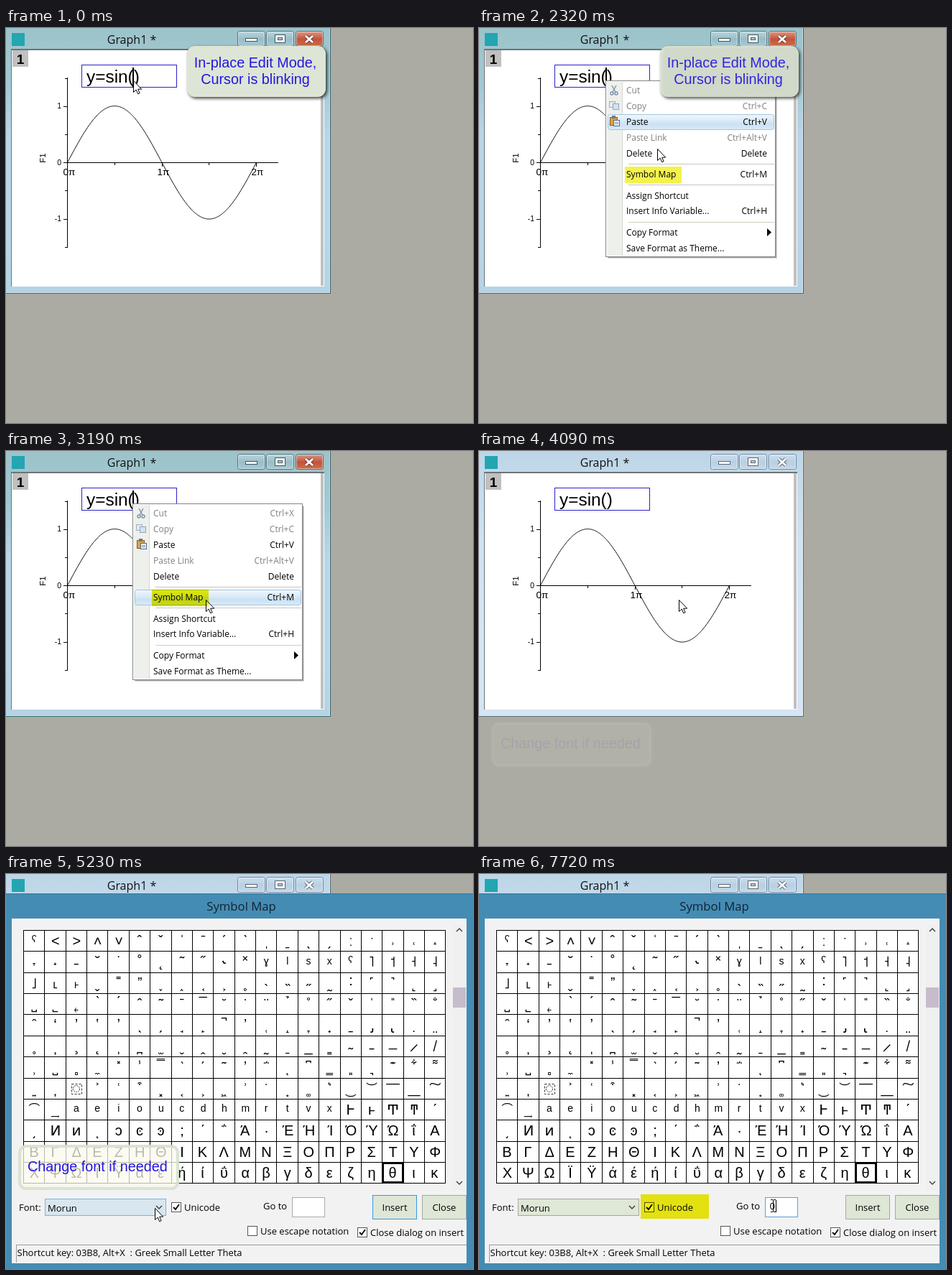
Write an HTML page with a canvas that moves like this. It is 650 px wide and 550 px high and loops after 8 s.

```html
<!DOCTYPE html>
<html lang="en">
<head>
<meta charset="utf-8">
<title>Symbol Map</title>
<style>
html, body { margin: 0; width: 100%; height: 100%; overflow: hidden; background: #acaba3; }
canvas { display: block; }
</style>
</head>
<body>
<canvas id="stage" width="650" height="550"></canvas>
<script>
const LOOP = 8000;
const W = 650, H = 550;
const PLAIN = '"Liberation Sans", "DejaVu Sans", sans-serif';
const UI = '"Open Sans", "Noto Sans", sans-serif';
const stage = document.getElementById('stage').getContext('2d');
let c = stage;

// Timing helpers
const ramp = (t, a, b) => Math.min(1, Math.max(0, (t - a) / (b - a)));
const smooth = u => u * u * (3 - 2 * u);
const mix = (a, b, u) => a + (b - a) * u;
const pulse = (t, a, b, d, e) => Math.min(ramp(t, a, b), 1 - ramp(t, d, e));

// Drawing helpers
function box(x, y, w, h, fill, line) {
  if (fill) { c.fillStyle = fill; c.fillRect(x, y, w, h); }
  if (line) { c.strokeStyle = line; c.lineWidth = 1; c.strokeRect(x + .5, y + .5, w - 1, h - 1); }
}

function text(s, x, y, size, color = '#000', align = 'left', family = UI, weight = '') {
  c.font = `${weight} ${size}px ${family}`;
  c.fillStyle = color;
  c.textAlign = align;
  c.fillText(s, x, y);
}

function poly(points, fill, line, width = 1, close = true) {
  c.beginPath();
  points.forEach(([x, y]) => c.lineTo(x, y));
  if (close) c.closePath();
  if (fill) { c.fillStyle = fill; c.fill(); }
  if (line) { c.strokeStyle = line; c.lineWidth = width; c.stroke(); }
}

function round(x, y, w, h, r) {
  c.beginPath();
  c.roundRect(x, y, w, h, r);
}

function vertical(y1, y2, ...colors) {
  const g = c.createLinearGradient(0, y1, 0, y2);
  colors.forEach((color, i) => g.addColorStop(i / (colors.length - 1), color));
  return g;
}

function faded(alpha, draw) {
  if (alpha <= 0) return;
  c.save();
  c.globalAlpha = alpha;
  draw();
  c.restore();
}

function cached(draw) {
  const layer = document.createElement('canvas');
  layer.width = W;
  layer.height = H;
  c = layer.getContext('2d');
  draw();
  c = stage;
  return layer;
}

// Graph window
function titleButton(x, w, active, close) {
  const fill = close && active ? vertical(5, 26, '#d99a86', '#c4533a', '#cf7048')
    : active ? vertical(5, 26, '#b9d6dd', '#98bdc6', '#a9cbd6')
    : vertical(5, 26, '#cbdfee', '#b9d0e3', '#c5daea');
  round(x + .5, 4.5, w - 1, 21, 3);
  c.fillStyle = fill;
  c.fill();
  c.lineWidth = 1;
  c.strokeStyle = active ? '#4c6f7a' : '#71869a';
  c.stroke();
  round(x + 1.5, 5.5, w - 3, 19, 2);
  c.strokeStyle = 'rgba(255,255,255,.5)';
  c.stroke();
}

function cross(x, y, width, color) {
  poly([[x - 5, y - 4.5], [x + 5, y + 4.5]], null, color, width, false);
  poly([[x + 5, y - 4.5], [x - 5, y + 4.5]], null, color, width, false);
}

function graphWindow(active) {
  box(0, 0, W, H, '#acaba3');
  box(0, 0, 452, 370, active
    ? vertical(0, 370, '#9dc3ca', '#a2c8d2', '#bad5e8', '#bad5e8', '#bad5e8', '#b5d3e4')
    : vertical(0, 370, '#bdd6e7', '#cfe2f1', '#d4e5f3', '#d4e5f3'));
  box(451, 0, 1, 370, active ? '#2f6570' : '#596c70');
  box(0, 369, 452, 1, active ? '#2f7470' : '#596c70');
  box(450, 0, 1, 369, 'rgba(255,255,255,.45)');
  box(0, 368, 451, 1, 'rgba(255,255,255,.35)');

  box(8, 7, 18, 18, '#23a5b2');
  text('Graph1 *', 175, 22, 16, '#111', 'center');
  titleButton(322, 39, active);
  titleButton(362, 39, active);
  titleButton(403, 39, active, true);
  const ink = active ? '#40555e' : '#5a6673';
  box(333, 14, 17, 5, '#fff', ink);
  box(374, 9, 15, 12, '#fff', ink);
  box(378, 13, 7, 4, '#b5ced8', ink);
  cross(422, 15.5, 5, active ? '#6d3a32' : ink);
  cross(422, 15.5, 3, '#fff');

  box(7, 29, 436, 331, '#fff');
  box(7, 29, 436, 2, '#6e7377');
  box(7, 29, 1, 331, '#6e7377');
  box(438, 31, 4, 328, '#c0c0c0');
  box(9, 31, 22, 23, '#c0c0c0');
  text('1', 20, 50, 19, '#000', 'center', PLAIN, 'bold');
  plot();
  box(105, 51, 133, 32, null, '#2a22c4');
  text('y=sin()', 112, 76, 24.4, '#000', 'left', PLAIN);
}

function plot() {
  box(85, 69, 1, 237, '#000');
  box(85, 187, 294, 1, '#000');
  for (let i = 0; i <= 6; i++) {
    const len = i % 2 ? 5 : 3;
    box(85 - len, Math.round(69.5 + i * 39.2), len, 1, '#000');
  }
  for (let i = 0; i <= 4; i++) box(85 + Math.round(i * 65.8), 188, 1, i % 2 ? 3 : 5, '#000');
  ['1', '0', '-1'].forEach((s, i) => text(s, 77, 112 + i * 78.5, 10.5, '#000', 'right', PLAIN));
  ['0π', '1π', '2π'].forEach((s, i) => text(s, 88 + i * 131, 205, 13.5, '#000', 'center', PLAIN));
  c.save();
  c.translate(55, 181);
  c.rotate(-Math.PI / 2);
  text('F1', 0, 0, 11.5, '#000', 'center', PLAIN);
  c.restore();
  const curve = [];
  for (let x = 0; x <= 263; x++) curve.push([x + 85.5, 187.3 - 78.7 * Math.sin(x / 263 * 2 * Math.PI)]);
  poly(curve, null, '#000', 1, false);
}

// Context menu: label, shortcut, baseline, disabled
const ITEMS = [
  ['Cut', 'Ctrl+X', 91, true],
  ['Copy', 'Ctrl+C', 113, true],
  ['Paste', 'Ctrl+V', 135],
  ['Paste Link', 'Ctrl+Alt+V', 157, true],
  ['Delete', 'Delete', 179],
  ['Symbol Map', 'Ctrl+M', 208],
  ['Assign Shortcut', '', 238],
  ['Insert Info Variable...', 'Ctrl+H', 259],
  ['Copy Format', '', 289],
  ['Save Format as Theme...', '', 311]
];

function menuIcons() {
  poly([[185, 80], [190, 89]], null, '#8d97a3', 1.5, false);
  poly([[191, 80], [186, 89]], null, '#8d97a3', 1.5, false);
  c.lineWidth = 1.4;
  c.strokeStyle = '#7b8fae';
  for (const x of [185, 191]) {
    c.beginPath();
    c.arc(x, 91, 2, 0, 7);
    c.stroke();
  }
  box(181, 102, 9, 9, '#e4ebf2', '#9fb0c2');
  box(186, 105, 9, 9, '#d5e2ee', '#8fa6bf');
  box(182, 124, 11, 12, '#d9a441', '#80622b');
  box(185, 122, 5, 4, '#777');
  box(187, 128, 9, 9, '#eef3fa', '#54688a');
  box(189, 131, 5, 1, '#7590b8');
  box(189, 133, 5, 1, '#7590b8');
}

function menu(mouseY) {
  box(180, 77, 235, 244, 'rgba(0,0,0,.16)');
  box(179, 76, 235, 244, 'rgba(0,0,0,.24)');
  box(176, 73, 237, 246, '#fff', '#868686');
  box(178, 75, 21, 242, '#eef0ec');
  box(199, 75, 1, 242, '#d5d7d2');
  box(208, 189, 203, 1, '#c5c5c5');
  box(208, 218, 203, 1, '#c5c5c5');
  box(208, 270, 203, 1, '#c9d3b8');
  const hover = ITEMS.find(item => Math.abs(mouseY - item[2] + 5) <= 11);
  if (hover) {
    const y = hover[2] - 15;
    round(179.5, y + .5, 231, 21, 3);
    c.fillStyle = vertical(y, y + 21, '#f1f7fc', '#e0eefa', '#cbe1f3', '#d8eaf8');
    c.fill();
    c.strokeStyle = '#a5c5de';
    c.lineWidth = 1;
    c.stroke();
  }
  menuIcons();
  for (const [label, keys, y, off] of ITEMS) {
    const color = off ? '#808080' : '#000';
    text(label, 205, y, 12, color);
    text(keys, 401, y, 12, color, 'right');
  }
  poly([[401, 279], [407, 284.5], [401, 290]], '#000');
}

// Symbol dialog
const COLS = 20, CELL = 29.37, GX = 24, GY = 78;
const UNUSED = [0x378, 0x379, 0x37f, 0x380, 0x381, 0x382, 0x383, 0x38b, 0x38d, 0x3a2];

function smallLetter(code) {
  if (code >= 0x363 && code <= 0x36f) return 'aeioucdhmrtvx'[code - 0x363];
  if (code >= 0x2e0 && code <= 0x2e3) return 'ɣlsx'[code - 0x2e0];
}

function symbol(code, left, top) {
  const cx = left + CELL / 2 + .5;
  if (code === 0x34f) {
    c.setLineDash([3, 2]);
    box(Math.round(cx) - 7, Math.round(top) + 8, 15, 15, null, '#333');
    c.setLineDash([2, 1]);
    c.beginPath();
    c.arc(cx, top + 15.5, 4.5, 0, 7);
    c.stroke();
    c.setLineDash([]);
    return;
  }
  const small = smallLetter(code);
  const s = small || String.fromCodePoint(code);
  c.font = `${small ? 14 : 20}px ${PLAIN}`;
  c.fillStyle = '#000';
  c.textAlign = 'left';
  // Centre the ink, since combining marks have no advance width.
  const m = c.measureText(s);
  const x = cx + (m.actualBoundingBoxLeft - m.actualBoundingBoxRight) / 2;
  c.fillText(s, x, top + (small ? 18.5 : 22));
}

function grid() {
  box(GX, GY, 588, 353, '#fff');
  let n = 0;
  for (let code = 0x2c1; code <= 0x3ba; code++) {
    if (UNUSED.includes(code)) continue;
    symbol(code, GX + n % COLS * CELL, GY + Math.floor(n / COLS) * CELL);
    n++;
  }
  for (let i = 0; i <= COLS; i++) box(Math.round(GX + i * CELL), GY, 1, 353, '#000');
  for (let i = 0; i <= 12; i++) box(GX, Math.round(GY + i * CELL), 588, 1, '#000');
  c.strokeStyle = '#000';
  c.lineWidth = 3;
  c.strokeRect(524.5, 402.5, 28, 27);
}

function chevron(x, y, dir) {
  poly([[x - 4, y - 2 * dir], [x, y + 2 * dir], [x + 4, y - 2 * dir]], null, '#444', 1.5, false);
}

function checkbox(x, y, on) {
  box(x, y, 14, 14, '#fff', '#555');
  if (on) poly([[x + 3, y + 7], [x + 6, y + 10], [x + 11, y + 3]], null, '#111', 2, false);
}

function dialog() {
  box(0, 27, W, 523, '#448cb4');
  box(0, 27, W, 1, '#35789d');
  text('Symbol Map', 327.5, 51, 16.7, '#14222e', 'center');
  box(8, 62, 633, 480, '#f2f2f2');
  grid();
  box(622, 70, 19, 370, '#f0f0f0');
  box(622, 158, 18, 28, '#c6bccb');
  chevron(631, 78, -1);
  chevron(631, 430, 1);

  text('Font:', 18, 469, 13);
  checkbox(230, 457, true);
  text('Unicode', 248, 469, 13);
  text('Go to', 358, 467, 13);
  box(398, 450, 46, 28, '#fff', '#a9aca9');
  for (const [label, x] of [['Insert', 510], ['Close', 579]]) {
    box(x, 447, 62, 34, '#dee6d6', '#a5aaa1');
    text(label, x + 31, 469, 13, '#000', 'center');
  }
  checkbox(336, 490, false);
  text('Use escape notation', 354, 502, 13);
  checkbox(489, 492, true);
  text('Close dialog on insert', 507, 504, 13);
  box(14, 516, 627, 1, '#9b9b9b');
  box(14, 516, 1, 25, '#9b9b9b');
  box(14, 541, 627, 1, '#fff');
  text('Shortcut key: 03B8, Alt+X  : Greek Small Letter Theta', 15.5, 532, 13);
}

function combo(hover) {
  box(54, 452, 169, 24, '#dfe7d7', '#a3a8a0');
  faded(hover, () => box(54, 452, 169, 24, '#d8e6f0', '#7fb1dc'));
  text('Morun', 58, 470, 13);
  chevron(213, 464, 1);
}

function goTo(t) {
  const focus = ramp(t, 6750, 6900);
  faded(1 - focus, () => box(510, 447, 62, 34, null, '#3399e6'));
  faded(focus, () => box(398, 450, 46, 28, null, '#5aa2dc'));
  if (t >= 7720) text('0', 404.5, 467, 13.5);
  if (t >= 6840 && t < 7360) box(405, 454, 1, 17, '#000');
  if (t >= 7720) box(413, 454, 1, 17, '#000');
}

// Notes, highlights and pointer
const NOTE = '#2416e0';

function editNote() {
  c.save();
  c.shadowColor = 'rgba(30,34,28,.9)';
  c.shadowBlur = 4;
  c.shadowOffsetX = c.shadowOffsetY = 2;
  round(252, 25, 193, 71, 11);
  c.fillStyle = '#dde5d6';
  c.fill();
  c.restore();
  text('In-place Edit Mode,', 347, 55, 19.8, NOTE, 'center', PLAIN);
  text('Cursor is blinking', 347, 78, 19.8, NOTE, 'center', PLAIN);
}

function fontNote() {
  round(19, 379, 220, 59, 9);
  c.fillStyle = 'rgba(250,250,238,.74)';
  c.fill();
  c.strokeStyle = 'rgba(216,224,206,.9)';
  c.lineWidth = 4;
  c.stroke();
  text('Change font if needed', 30, 414, 19.8, NOTE, 'left', PLAIN);
}

function marker(x, y, w, h, alpha) {
  faded(alpha, () => {
    c.globalCompositeOperation = 'multiply';
    box(x, y, w, h, '#f0ee10');
  });
}

function pointer(t) {
  const legs = [
    [1620, 2750, 177, 73, 282, 214],
    [2850, 3160, 282, 214, 278, 207],
    [4120, 4820, 278, 207, 226, 455],
    [4820, 5230, 226, 455, 207, 465],
    [6030, 6590, 207, 465, 409, 461]
  ];
  const [a, b, x1, y1, x2, y2] = legs.filter(leg => t >= leg[0]).pop() || legs[0];
  const u = smooth(ramp(t, a, b));
  return [mix(x1, x2, u), mix(y1, y2, u)];
}

function arrow(x, y) {
  const shape = [[0, 0], [0, 16], [3.7, 12.6], [6.2, 18.3], [8.6, 17.2], [6.2, 11.7], [11.2, 11.7]];
  poly(shape.map(([dx, dy]) => [x + .5 + dx, y + .5 + dy]), '#fff', '#000');
}

function beam(x, y) {
  box(x - 3, y - 8, 7, 3, '#fff');
  box(x - 3, y + 7, 7, 3, '#fff');
  box(x, y - 7, 1, 16, '#000');
  for (const dy of [-8, 9]) {
    box(x - 3, y + dy, 3, 1, '#000');
    box(x + 1, y + dy, 3, 1, '#000');
  }
}

const MENU_ON = 1390, MENU_OFF = 3700, DIALOG_ON = 4120;
let activeLayer, idleLayer, dialogLayer;

function draw(t) {
  const [x, y] = pointer(t).map(Math.round);
  c.drawImage(t < MENU_OFF ? activeLayer : idleLayer, 0, 0);
  if (t < 630 || t >= 1130 && t < MENU_OFF) box(176, 55, 2, 28, '#000');
  if (t >= MENU_ON && t < MENU_OFF) menu(t < 1620 ? 0 : pointer(t - 190)[1]);
  if (t >= DIALOG_ON) {
    c.drawImage(dialogLayer, 0, 0);
    combo(pulse(t, 5000, 5200, 6450, 6800));
    goTo(t);
  }
  if (x > 400) beam(x, y);
  else arrow(x, y);
  marker(203, 193, 79, 23, pulse(t, 1650, 2550, 3240, 4000));
  marker(225, 446, 95, 34, ramp(t, 6000, 6850));
  faded(1 - ramp(t, 2250, 3150), editNote);
  faded(pulse(t, 4010, 4910, 6450, 7350), fontNote);
}

function start() {
  activeLayer = cached(() => graphWindow(true));
  idleLayer = cached(() => graphWindow(false));
  dialogLayer = cached(dialog);
}

start();
const begin = performance.now();
function tick() {
  draw((performance.now() - begin) % LOOP);
  requestAnimationFrame(tick);
}
tick();
</script>
</body>
</html>
```
